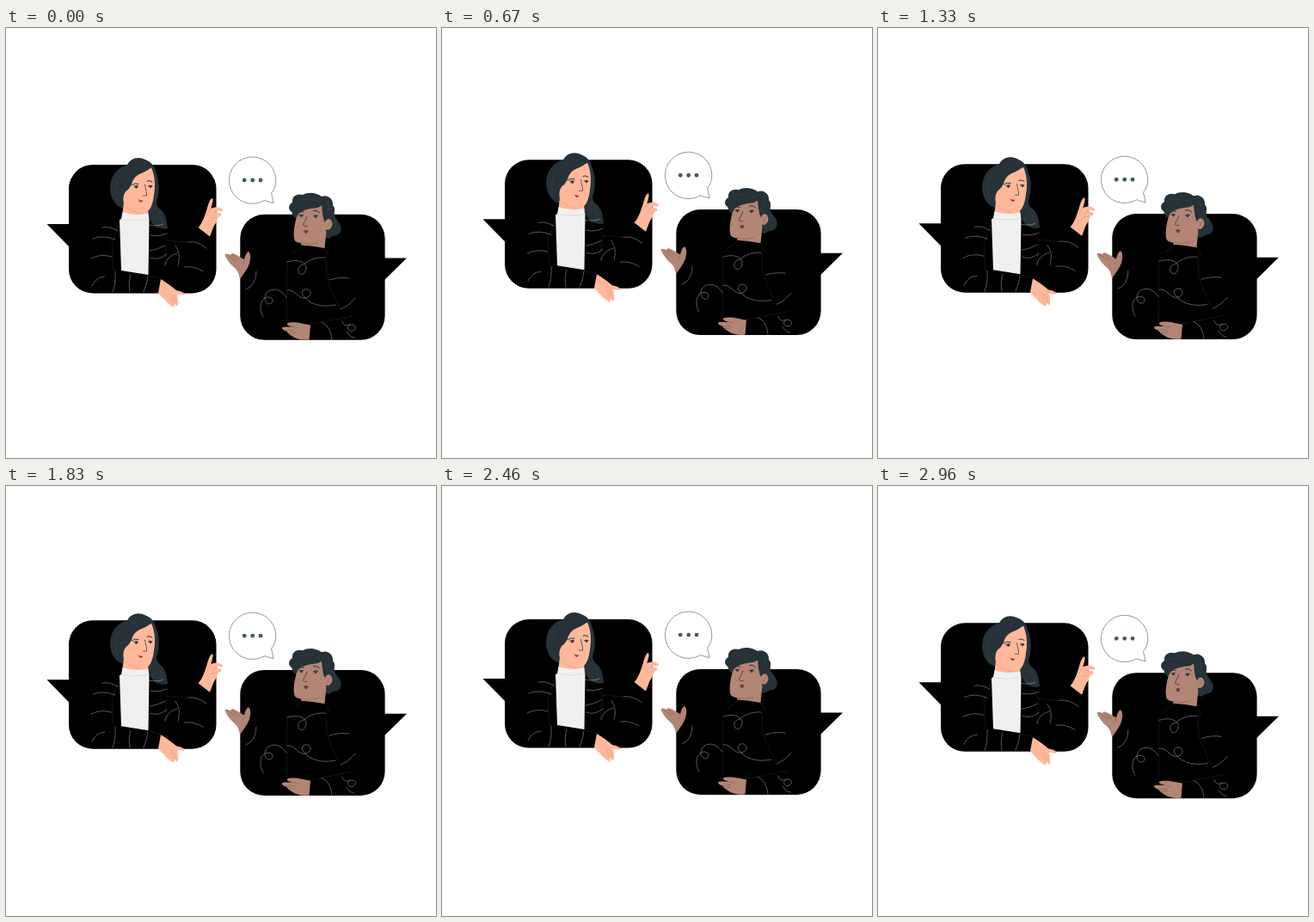
Write an HTML page that moves like this. It is 500 by 500 pixels and loops after 3000 ms.

```html
<!DOCTYPE html>
<html lang="en">
<head>
<meta charset="utf-8">
<title>Conversation</title>
<style>
  html, body { margin: 0; width: 100%; height: 100%; overflow: hidden; background: #fff; }
  svg { display: block; width: 100vw; height: 100vh; }
  .hair { fill: #263238; }
  .peach { fill: #ffb99a; }
  .brown { fill: #b28575; }
  .line { fill: none; stroke-linecap: round; stroke-linejoin: round; }
  .ink { stroke: #263238; stroke-width: 1; }
  .nose { stroke: #263238; stroke-width: .7; }
  .fold { stroke: #fff; stroke-width: .5; opacity: .68; }
  .faint { stroke: #fff; stroke-width: .4; opacity: .2; }
  .crease { stroke: #e58a70; stroke-width: .5; }
  .shade { stroke: #7d564b; stroke-width: .5; }
  .strand { stroke: #455a64; stroke-width: .4; opacity: .6; }
</style>
</head>
<body>
<svg viewBox="0 0 500 500">
  <g id="scene">
    <!-- left card -->
    <rect x="73" y="159" width="171.5" height="149.5" rx="28"/>
    <path d="M47.5 228H74V255Z"/>

    <g id="woman">
      <path class="hair" d="M141 159C145 151 154 149 162 153C169 156 174 161 174 167C178 174 179 188 176 199C174 205 176 208 181 212C186 217 187 224 188 233C180 235 171 231 168 223L160 213L138 210C128 208 122 200 121 187C121 174 127 163 141 159Z"/>
      <path class="peach" d="M137 203L135 219H166L164 205Z"/>
      <path class="peach" d="M146 182C147 177 150 172 157 169C163 167 166 164 169 162.500C173 171 174 183 172 194C171 204 168 214 160 215.500C150 217 141 210 137.500 205C135 199 137 190 142 188Z"/>
      <path class="line crease" d="M138 207Q147 214.500 158 215.500"/>
      <path class="line ink" d="M146.500 182.500Q150 179.700 154 181.300M164 178Q167 176.500 170 179M148.700 184.300q2-1.500 5-.6M165.500 183.600q2-1.300 4.500 0"/>
      <path class="line nose" d="M161.500 182C162 187 164 191 163.500 195L159.500 195"/>
      <circle class="hair" cx="151.500" cy="185" r="1.500"/>
      <circle class="hair" cx="168" cy="184.500" r="1.400"/>
      <path d="M153.500 199q3 2 6 1.500q-1.500 3-4 1.800z" fill="#9b3b31"/>
      <path class="line strand" d="M166 156C157 160 146 162 139 169M172 165C175 177 176 189 173 202M133 171C126 181 126 194 131 203M170 207q10 5 12 21M178 216q-7 3-8 9"/>

      <path d="M135.500 214Q149 219 165 215.500L166.500 222.500L165.500 287L134 282L132 223L134 222Z" fill="#f0f0f0"/>
      <path class="line" stroke="#d2d2d2" stroke-width=".6" d="M133.500 222.500Q149 225 166 222.500"/>
      <path class="line" stroke="#d6d6d6" stroke-width=".6" stroke-dasharray=".1 7" d="M137 231H163M140 239H164M136 248H163M141 257H164M137 266H163M140 275H163"/>
      <path class="line fold" d="M112 232Q121 230 130 236M101 245Q113 240 127 246M99 268Q110 262 123 266M100 300Q105 289 115 289M124 307Q128 297 127 283M145 287Q142 295 144 307M165 289Q164 298 160 307M168 241Q177 243 187 239M167 259Q175 258 185 253M166 229Q177 231 183 228M168 267Q177 271 187 263M185 276C186 269 191 264 199 262M197 253Q204 263 200 276M211 249Q222 247 233 256M207 278Q218 276 229 283"/>
      <path class="line faint" d="M132 224L123 252L125 282M167 223L187 247L184 276M187 247L210 249M166 288L179 291"/>

      <path class="peach" d="M223.500 232C229 226 231 218 233.500 211C235 206 236.500 199.500 239.500 198C242 199 239.500 205 238.500 210C241 209 243 208 246.500 208.500C250 209 253 211 252 213C249 214 246 211 243.500 214L249 215C252 217 250 219 247.500 219.500L246 222C245 226 242 229 241 232L237 242.500Z"/>
      <path class="line crease" d="M238.500 210Q236 214 234 217M243.500 214L239 218M245 220L239 221"/>
      <path class="peach" d="M180 292C187 296 193 301 198 305C203 306 207 307.500 208 310C205 311 202 310 199 309.500C200 314 201 320 199.500 323C198 324 196 321 195.500 319C196 322 196 325 194 324C190 322 183 315 177 308Z"/>
      <path class="line crease" d="M195.500 310L197.500 320M192 310L194.500 320"/>
    </g>

    <!-- right card -->
    <rect x="272.300" y="216.800" width="168.300" height="146" rx="28"/>
    <path d="M466 267.500H440V293Z"/>

    <g id="man">
      <path class="hair" d="M335 220C332 217 334 215 331 213C327 209 330 204 333 203C332 196 338 192 345 194C352 190 362 192 367 196C374 193 381 199 380 206C384 210 381 214 382 219C386 225 392 230 389 237C387 243 380 240 377 244C372 246 367 240 365 235L338 222Z"/>
      <path class="brown" d="M345 240L343 252.500Q357 253 370.500 256L372.500 236Z"/>
      <path class="brown" d="M338 220C340 214 346 212 352 210.500C358 209 362 210 367 206.500C368 214 368 221 371 226C373 220 379 221 379.500 228C379 234 374 236 372 234C372 242 369 250 362 251C353 252 341 251 336.500 248C333 244 335 229 338 220Z"/>
      <path class="line ink" d="M340 214.700Q343 212.700 346.500 214M357.500 212.500Q361 211 364.500 214.500M341 217.800q2-1.300 4.500-.3M357.500 218.500q2-1.700 5-.3"/>
      <path class="line nose" d="M350 219C349 223 346 226 345.500 229Q347 231 350 230.500"/>
      <circle class="hair" cx="343.500" cy="218.600" r="1.300"/>
      <circle class="hair" cx="360" cy="219.400" r="1.400"/>
      <path d="M346 236q3-2.500 5.500 0q-1 3.500-3.500 3z" fill="#7a4039"/>
      <path class="line shade" d="M374 231q0-4 3-5M344 250.500Q354 252.500 363 249.500"/>
      <path class="line strand" d="M335 202Q350 196 365 203M374 199q3 8 1 15M379 218q6 6 4 13"/>

      <path class="line fold" d="M327 272C336 269 346 270 349 277C350 284 344 289 341 285C338 280 341 276 346 275C353 269 362 266 371 267M327 305C334 303 338 312 345 314C354 315 357 306 351 304C345 302 342 309 347 313C355 322 368 325 383 322M299 336C293 326 296 313 305 313C311 313 312 320 306 321C300 320 299 311 305 306C314 301 321 306 326 313M376 293Q388 289 399 291M389 327Q399 323 406 314M379 362Q378 347 367 342M391 341C392 346 396 347 400 345C406 344 409 349 404 352C398 354 395 348 400 345M396 353q4 7 9 7M279 304Q291 299 291 283"/>
      <path class="line faint" d="M327 270L326 341M372 266L373 292L387 324M353 345L403 335M344 254L331 263M371 256L376 266"/>

      <path class="brown" d="M254.500 263.500C256 261.500 259 263 261 264C262 261 265 262 267 263.500C271 265 274 268 277 269C278 266 279 261 282 260C285 262 284.500 269 283 274C281 280 276 286 272 292C271 287 270 283 267 280C262 276 256 269 254.500 263.500Z"/>
      <path class="line shade" d="M258 264L267 271M263 264L271 270M277 269Q278 272 275 275"/>
      <path class="brown" d="M321 348.500C323 346.500 329 348 333.500 347.500C330 346.500 326 346 327 343.500C331 341.500 339 342.500 344 343.500L354 345.500L352.500 362.500C345 363 338 362 334.500 359.500C330 357 327 354 326 352.500C323 351.500 320.500 350 321 348.500Z"/>
      <path class="line shade" d="M333.500 347.500L340 349M329 355L337 354.500M326 352.500L336 351.500"/>
    </g>

    <!-- typing bubble -->
    <path d="M308.500 192C312 188 314 182.500 313.800 176.500A27.200 27.200 0 1 0 300.500 200.500Q306 202.500 311 203.500Q310 198 308.500 192Z" fill="#fff" stroke="#263238" stroke-width=".5"/>
    <g fill="#455a64">
      <circle cx="277.200" cy="177" r="2.400"/>
      <circle cx="286.700" cy="177" r="2.400"/>
      <circle cx="296" cy="177" r="2.400"/>
    </g>
  </g>
</svg>
<script>
  const scene = document.getElementById("scene");
  const period = 1500, lead = 40, rise = 6.4, rest = 0.34;

  // Constant-speed bob: up for half a period, then down.
  function draw(now) {
    const phase = ((now + lead) % period) / period;
    const lift = 1 - Math.abs(1 - 2 * phase);
    scene.setAttribute("transform", `translate(0 ${rest - rise * lift})`);
  }

  const start = performance.now();
  function tick() {
    draw(performance.now() - start);
    requestAnimationFrame(tick);
  }
  tick();
</script>
</body>
</html>
```
